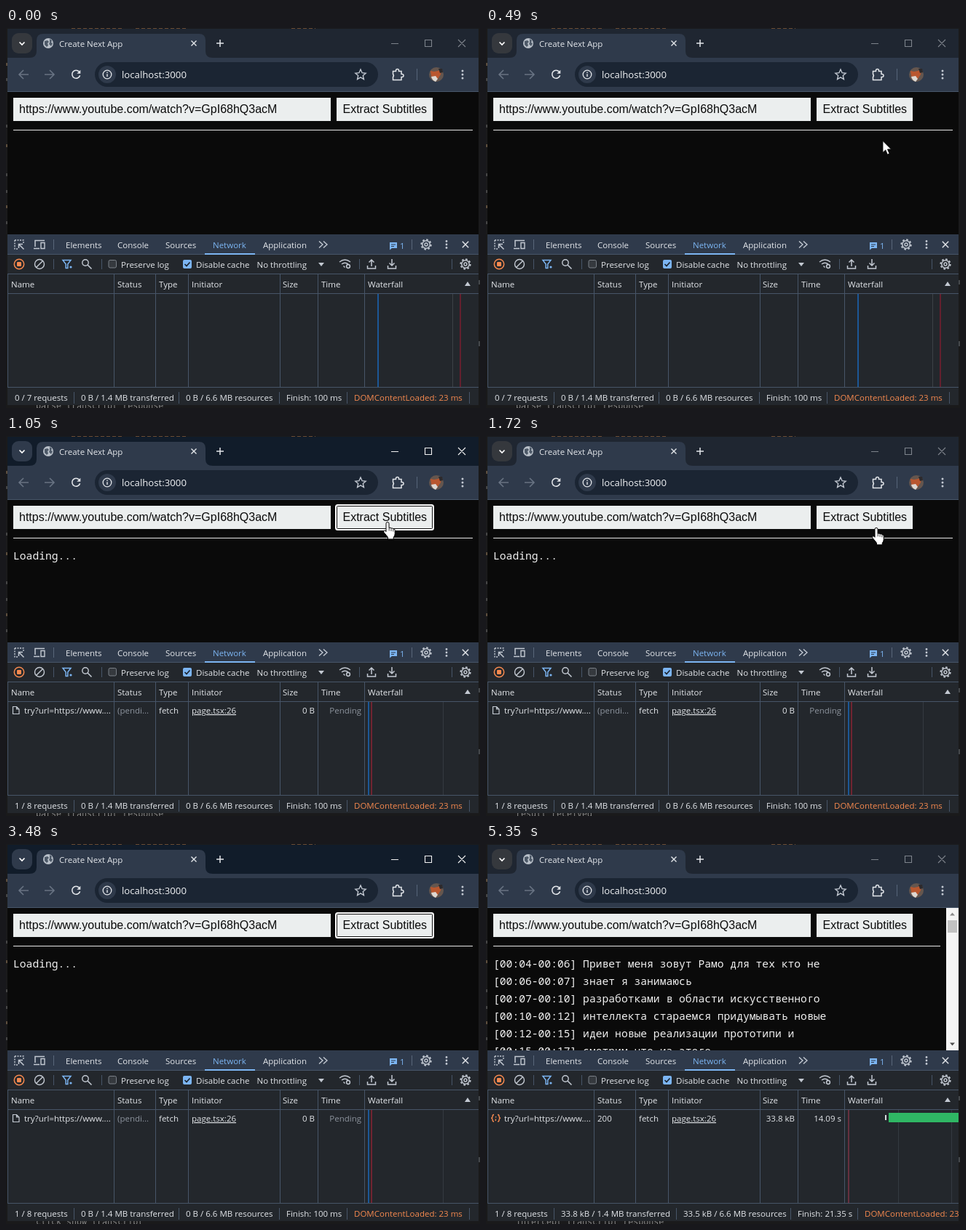
Write an HTML page that moves like this. It is 651 px wide and 523 px high and loops after 5.43 s.

```html
<!DOCTYPE html>
<html lang="en">
<head>
<meta charset="utf-8">
<title>Subtitle extractor</title>
<style>
html, body { margin: 0; width: 100%; height: 100%; overflow: hidden; background: #1a1a1b; }
svg { display: block; width: 651px; height: 523px; }
text { white-space: pre; }
.ui { font: 11.5px "Open Sans", "Noto Sans", sans-serif; }
.url { font: 13.2px "Open Sans", "Noto Sans", sans-serif; }
.form { font: 16px "Liberation Sans", Arial, sans-serif; }
.mono { font: 14.667px "Noto Sans Mono", "DejaVu Sans Mono", monospace; }
.term { font: 11.65px "DejaVu Sans Mono", monospace; }
</style>
</head>
<body>
<svg id="stage" viewBox="0 0 651 523"></svg>
<script>
const LOOP = 5430;
const LIGHT = '#e3e6ea', ICON = '#c3c9d2', DIM = '#8d949e', FAINT = '#687383';
const LINE = '#475568', BLUE = '#7cb5f2', ORANGE = '#f5894f';
const BAR = '#2f3a4b', PANEL = '#23272c', PAGE = '#0a0a0a';

const rect = (x, y, w, h, fill, rx = 0, more = '') =>
  `<rect x="${x}" y="${y}" width="${w}" height="${h}" fill="${fill}" rx="${rx}" ${more}/>`;
const text = (x, y, s, fill = LIGHT, cls = 'ui', more = '') =>
  `<text x="${x}" y="${y}" fill="${fill}" class="${cls}" ${more}>${s}</text>`;
const line = (d, color = ICON, w = 1.4, more = '') =>
  `<path d="${d}" fill="none" stroke="${color}" stroke-width="${w}" ${more}/>`;
const shape = (d, fill, more = '') => `<path d="${d}" fill="${fill}" ${more}/>`;
const ring = (x, y, r, color = ICON, w = 1.4, more = '') =>
  `<circle cx="${x}" cy="${y}" r="${r}" fill="none" stroke="${color}" stroke-width="${w}" ${more}/>`;
const dot = (x, y, r, fill = ICON) => `<circle cx="${x}" cy="${y}" r="${r}" fill="${fill}"/>`;
const group = (id, body, more = '') => `<g id="${id}" ${more}>${body}</g>`;
const vline = (x, y, h, color = LINE, w = 1) => rect(x, y, w, h, color);
const cross = (x, y, r, color = LIGHT, w = 1.4) =>
  line(`M${x - r} ${y - r}l${2 * r} ${2 * r}m0 ${-2 * r}l${-2 * r} ${2 * r}`, color, w);
const kebab = (x, y, gap, r) => [-gap, 0, gap].map(d => dot(x, y + d, r)).join('');
const gear = (x, y) => ring(x, y, 5.2, ICON, 1.5) + ring(x, y, 2) +
  ring(x, y, 6.7, ICON, 1.9, 'stroke-dasharray="2.6 2.66"');

function desktop() {
  const marks = [48, 69, 133, 160, 200, 223, 244, 266]
    .map((y, i) => rect(0, y, 2, 4, i % 3 ? '#454545' : '#5c4d3d')).join('');
  return rect(0, 0, 651, 523, '#1a1a1b') + marks +
    line('M90 .5H160M178 .5H250M392 .5H425', '#6b4b31', 1, 'stroke-dasharray="5 3"') +
    `<text id="log" x="41" y="524" fill="#858585" class="term"></text>` +
    rect(649, 347, 2, 6, '#44474a') + rect(649, 431, 2, 7, '#44474a');
}

function chrome() {
  return `<rect id="title" x="2" y="1" width="647" height="44"/>` +
    `<rect id="menu" x="8" y="7" width="28" height="28" rx="9"/>` +
    line('M18.5 19.5l3.5 3.5 3.5-3.5', '#fff', 1.7) +
    shape('M32 41q10 0 10-9V17q0-9 9-9H265q9 0 9 9V32q0 9 10 9Z', BAR) +
    dot(58, 21, 7, '#b9c0c9') +
    shape('M53 18l4-1 2 2-2 2 1 3-2 2-3-3ZM60 15l3 2-1 3 2 1-2 4-3-3 1-2Z', '#4d5968') +
    text(73, 25.5, 'Create Next App') + cross(258, 21, 3.5) +
    line('M289 21h10M294 16v10', LIGHT, 1.5) +
    `<g id="controls" fill="none" stroke-width="1.1"><path d="M529 21.5h10M575.5 16.5h9v9h-9ZM621 16l10 10m0-10l-10 10"/></g>` +
    rect(2, 41, 647, 47, BAR) + rect(2, 87, 647, 1, '#48566a') +
    line('M31 64H18.5M24 58l-6 6 6 6M53 64h12.5M60 58l6 6-6 6', FAINT, 1.6) +
    line('M100.5 60.2a5.5 5.5 0 1 0 1.1 5', LIGHT, 1.6) + shape('M102.3 57.8v5h-5Z', LIGHT) +
    rect(122, 47, 389, 34, '#1b2533', 17) + dot(139, 64, 12, BAR) +
    ring(139, 64, 5.8, LIGHT, 1.3) + line('M139 63.2v3.8M139 60.5v1.5', LIGHT, 1.4) +
    text(159, 68.8, 'localhost:3000', '#f1f3f5', 'url') +
    line('M487 57l2.1 4.7 5 .5-3.8 3.3 1.1 5-4.4-2.6-4.4 2.6 1.1-5-3.8-3.3 5-.5Z', ICON, 1.4) +
    line('M531.5 59.5h4v-1a2 2 0 0 1 4 0v1h3.5v4h1a2 2 0 0 1 0 4h-1v4h-11.5v-4a3 3 0 0 0 0-4Z', LIGHT, 1.5) +
    vline(564, 56, 16, '#566579') +
    dot(591, 64, 10, '#65564e') + shape('M583 59l5 1 5-1 5-2-1 7-4 6-5 2-4-6Z', '#b9572f') +
    shape('M584 67l6-1 3 4-3 4q-5-2-6-7Z', '#ded8d2') + shape('M594 56h5l1 5-4 1Z', '#2d2a2c') +
    kebab(627, 64, 5, 1.5);
}

function page() {
  const lines = [
    '[00:04-00:06] Привет меня зовут Рамо для тех кто не',
    '[00:06-00:07] знает я занимаюсь',
    '[00:07-00:10] разработками в области искусственного',
    '[00:10-00:12] интеллекта стараемся придумывать новые',
    '[00:12-00:15] идеи новые реализации прототипи и',
    '[00:15-00:17] смотрим что из этого'
  ];
  const subtitles = lines.map((s, i) => text(10, 170 + 24 * i, s, '#f2f2f2', 'mono')).join('');
  const scrollbar = rect(632, 88, 17, 196, '#f4f4f4') + rect(634, 105, 13, 17, '#c1c1c1') +
    shape('M637 98.5l3.5-4 3.5 4Z', '#8a8a8a') + shape('M637 273.5l3.5 4 3.5-4Z', '#505050');
  return rect(2, 88, 647, 196, PAGE) +
    rect(10, 96, 436, 32, '#ebeeee') +
    text(18, 117, 'https://www.youtube.com/watch?v=GpI68hQ3acM', '#0a0a0a', 'form') +
    rect(454, 96, 132, 32, '#ebeeee') +
    group('focus', rect(453, 95, 134, 34, 'none', 2.5, 'stroke="#fff" stroke-width="2"') +
      rect(454.5, 96.5, 131, 31, 'none', 1, 'stroke="#111"')) +
    text(462.5, 117, 'Extract Subtitles', '#0a0a0a', 'form') +
    `<rect id="rule" x="10" y="140" height="1" fill="#e8e8e8"/>` +
    group('loading', text(10, 170, 'Loading...', '#f2f2f2', 'mono', 'font-weight="500"')) +
    group('subtitles', subtitles + scrollbar);
}

function footer(id, seps, labels) {
  const starts = [12, ...seps.map(x => x + 10)];
  return group(id, seps.map(x => vline(x, 501, 16)).join('') +
    labels.map((s, i) => text(starts[i], 513, s, i === 4 ? ORANGE : LIGHT)).join(''));
}

function toolbars() {
  const tabs = [[82, 'Elements'], [153, 'Console'], [219, 'Sources'], [284, 'Network'], [353, 'Application']];
  return rect(2, 284, 647, 28, BAR) + rect(2, 311, 647, 1, LINE) +
    line('M12 292h12v5M12 292v12h5', ICON, 1.4, 'stroke-dasharray="2 1.5"') +
    line('M24.5 304.5l-7-7M17.5 303v-5.5h5.5', ICON, 1.5) +
    line('M40 301v-8.5h13M38 303.5h8', ICON, 1.5) + line('M48 295.5h5v8h-5Z', ICON, 1.4) +
    vline(65, 291, 14, '#59677a') +
    tabs.map(([x, s]) => text(x, 302.5, s, s === 'Network' ? BLUE : LIGHT)).join('') +
    rect(273, 310, 69, 2, BLUE) +
    line('M430 293.5l5 4.5-5 4.5M436 293.5l5 4.5-5 4.5', ICON, 1.4) +
    shape('M527 295h10v8h-7l-3 2.5Z', BLUE) + line('M529 298h6M529 300.5h4', BAR, 1) +
    text(541, 303.5, '1', BLUE) + vline(557, 291, 14, '#59677a') +
    gear(577, 298) + kebab(605, 298, 4.5, 1.4) + cross(631, 298, 4.2) +
    rect(2, 312, 647, 27, PANEL) +
    ring(18, 325, 6.7, ORANGE, 1.5) + rect(15, 322, 6, 6, ORANGE, 1) +
    ring(46, 325, 6.5) + line('M41.5 329.5l9-9') + vline(65, 318, 14) +
    line('M78 319.5h11l-4.2 5.5v5.5h-2.6V325Z', BLUE, 1.5) + dot(89, 329, 1.6, BLUE) +
    ring(109, 323, 4.2) + line('M112 326l5.5 5.5', ICON, 1.6) + vline(131, 318, 14) +
    rect(141, 319.5, 10.5, 10.5, '#35393e', 2, 'stroke="#7b8188"') + text(158, 329.5, 'Preserve log') +
    rect(243, 319, 12, 12, BLUE, 2) + line('M245.5 325l2.5 2.5 4.5-5', '#17202b', 1.6) +
    text(261, 329.5, 'Disable cache') + text(344.5, 329.5, 'No throttling') +
    shape('M429 323h8l-4 5Z', ICON) +
    line('M458 322q7.5-6 15 0M461 325q4.5-3.4 9 0M463.5 327.5l2 2', ICON, 1.4) +
    ring(470, 328, 2.4, ICON, 1.5) + vline(485, 318, 14) +
    line('M502 328v-9M498.5 322.5l3.5-3.5 3.5 3.5M496.5 327v4h11v-4', ICON, 1.5) +
    line('M530 318v9M526.5 323.5l3.5 3.5 3.5-3.5M524.5 327v4h11v-4', ICON, 1.5) +
    vline(612, 318, 14) + gear(631, 325);
}

function network() {
  const columns = [[7, 'Name'], [153, 'Status'], [210, 'Type'], [255, 'Initiator'],
    [380, 'Size'], [433, 'Time'], [497, 'Waterfall']];
  const row = (status, size, time, muted) =>
    text(25, 382, 'try?url=https://www....') + text(153, 382, status, muted ? DIM : LIGHT) +
    text(210, 382, 'fetch') + text(255, 382, 'page.tsx:26', LIGHT, 'ui', 'text-decoration="underline"') +
    text(424, 382, size, LIGHT, 'ui', 'text-anchor="end"') +
    text(488, 382, time, muted ? DIM : LIGHT, 'ui', 'text-anchor="end"');
  return rect(2, 338, 647, 183, PANEL) + rect(2, 338, 647, 1, LINE) + rect(2, 365, 647, 1, LINE) +
    columns.map(([x, s]) => text(x, 357, s)).join('') + shape('M630 355l4-6 4 6Z', ICON) +
    [2, 148, 205, 250, 376, 428, 492].map(x => vline(x, 339, 156)).join('') +
    group('idle', vline(510, 366, 128, '#1c5796', 2) + vline(613, 366, 128, '#3c4147') +
      vline(623, 366, 128, '#64202e', 2)) +
    group('pending', row('(pendi...', '0 B', 'Pending', true) +
      line('M9.5 372.5h5l3.5 3.5v6.5h-8.5ZM14.5 372.5v3.5h3.5', ICON, 1.2) +
      vline(497, 366, 128, '#1c5796', 2) + vline(501, 366, 128, '#702431', 2) + vline(600, 366, 128, '#343a41')) +
    group('done', row('200', '33.8 kB', '14.09 s', false) +
      line('M11 372.5q-2 0-2 2.2t-1.8 2.6q1.8.3 1.8 2.5t2 2.2M16 372.5q2 0 2 2.2t1.8 2.6q-1.8.3-1.8 2.5t-2 2.2M13.5 375v1.5M13.5 378.5l-.5 2.5', ORANGE, 1.4) +
      vline(497, 366, 128, '#66303f', 2) + vline(566, 366, 128, '#343a41') + vline(639, 366, 128, '#343a41') +
      rect(548, 373, 2, 7, '#d5d8db') + rect(553, 370, 96, 13, '#2fb764')) +
    rect(2, 494, 647, 1, LINE) +
    footer('footIdle', [93, 237, 375, 468, 636],
      ['0 / 7 requests', '0 B / 1.4 MB transferred', '0 B / 6.6 MB resources', 'Finish: 100 ms', 'DOMContentLoaded: 23 ms']) +
    footer('footPending', [93, 237, 375, 468, 636],
      ['1 / 8 requests', '0 B / 1.4 MB transferred', '0 B / 6.6 MB resources', 'Finish: 100 ms', 'DOMContentLoaded: 23 ms']) +
    footer('footDone', [93, 261, 418, 510],
      ['1 / 8 requests', '33.8 kB / 1.4 MB transferred', '33.5 kB / 6.6 MB resources', 'Finish: 21.35 s', 'DOMContentLoaded: 23 ms']);
}

const cursors =
  group('arrow', shape('M0 0V16.2L3.8 12.6 6.4 18.8 9.2 17.6 6.6 11.6H11.6Z', '#fff', 'stroke="#000" stroke-width=".9"')) +
  group('hand', shape('M4 2q0-2 2-2t2 2V8q2.5-1 3 .6 2.4-.7 2.8.8 2.4-.3 2.4 2V16q0 3-2 5v2.5H6.5V21Q4.500 18 1 14.200 0 12 1.500 11.500 3 11.300 4 13Z', '#fff', 'stroke="#000"') +
    line('M8.200 8v4M11 9v3.500M13.800 10v3', '#222', .9));

document.getElementById('stage').innerHTML =
  `<defs><clipPath id="win"><rect x="2" y="1" width="647" height="518"/></clipPath></defs>` + desktop() +
  `<g clip-path="url(#win)">${chrome()}${page()}${toolbars()}${network()}</g>` + cursors;

const $ = id => document.getElementById(id);
const show = (id, on) => $(id).setAttribute('display', on ? 'inline' : 'none');
const mix = (a, b, p) => a + (b - a) * p;

// Pointer positions advance in discrete 70 ms captures.
function pointer(t) {
  if (t < 70) return null;
  if (t < 630) {
    const p = 1 - (1 - Math.floor((t - 70) / 70) / 7) ** 1.4;
    return { kind: 'arrow', x: mix(644, 538, p), y: mix(388, 139, p) };
  }
  if (t < 710) return { kind: 'hand', x: 522, y: 121 };
  if (t < 1720) return { kind: 'hand', x: 518, y: 118.5 };
  if (t < 2220) {
    const p = ((Math.floor((t - 1720) / 71.5) + 1) / 7) ** 1.3;
    const y = mix(119, 211, p);
    return { kind: y < 128 ? 'hand' : 'arrow', x: mix(520, 646, p), y };
  }
  return null;
}

function render(t) {
  const active = (t >= 910 && t < 1260) || (t >= 3480 && t < 5350);
  const requested = t >= 980, answered = t >= 3680, done = t >= 3750;
  $('title').setAttribute('fill', active ? '#111c2a' : '#1f2631');
  $('menu').setAttribute('fill', active ? BAR : '#35383d');
  $('controls').setAttribute('stroke', active ? '#f2f2f2' : '#7d838b');
  $('rule').setAttribute('width', answered ? 614 : 631);
  $('log').textContent = t < 1260 ? 'parse transcript response' : t < 3480 ? 'result received' :
    t < 3680 ? 'click show transcript' : 'intercept transcript response';
  show('focus', active);
  show('loading', requested && !answered);
  show('subtitles', answered);
  show('idle', !requested);
  show('footIdle', !requested);
  show('pending', requested && !done);
  show('footPending', requested && !done);
  show('done', done);
  show('footDone', done);
  const at = pointer(t);
  for (const kind of ['arrow', 'hand']) {
    show(kind, at && at.kind === kind);
    if (at) $(kind).setAttribute('transform', `translate(${at.x} ${at.y})`);
  }
}

const start = performance.now();
function tick() {
  render((performance.now() - start) % LOOP);
  requestAnimationFrame(tick);
}
tick();
</script>
</body>
</html>
```
